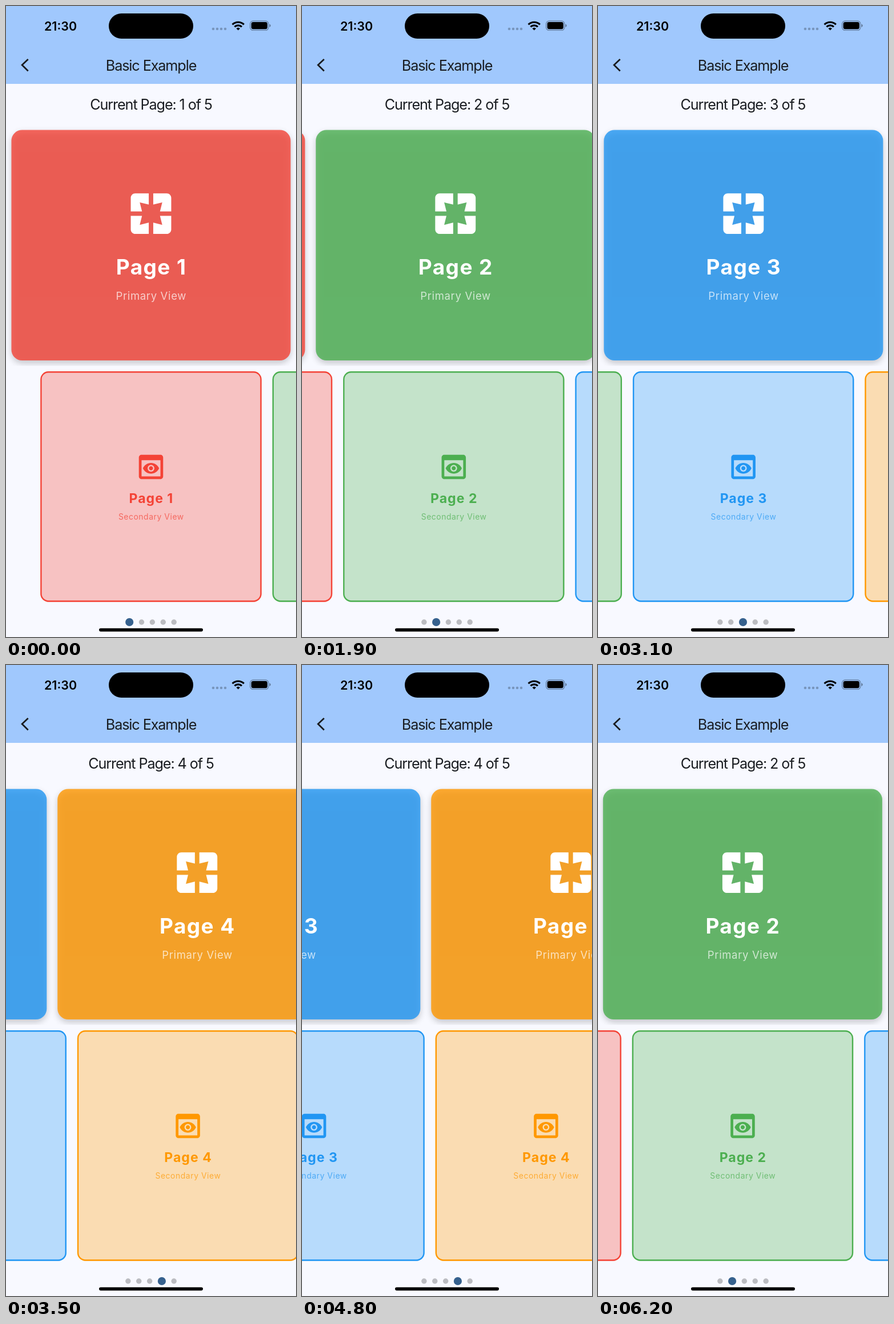
Recreate the animation shown at these times as an HTML page. Size 508 px wide and 1102 px high, loop 6300 ms.

```html
<!DOCTYPE html>
<html lang="en">
<head>
<meta charset="utf-8">
<title>Synced pages</title>
<style>
  html, body { margin: 0; width: 100%; height: 100%; overflow: hidden; background: #f8f9ff; }
  svg { display: block; width: 508px; height: 1102px; }
  text { font-family: Inter, "Open Sans", sans-serif; font-optical-sizing: none; text-anchor: middle; }
  .bar { font-size: 25.2px; letter-spacing: -1.1px; fill: #191c20; }
  .clock { font-size: 21.5px; font-weight: 600; }
  .title1 { font-size: 37px; font-weight: 700; letter-spacing: 1.4px; fill: #fff; }
  .note1 { font-size: 18.5px; letter-spacing: .65px; fill: #fff; opacity: .7; }
  .title2 { font-size: 23.1px; font-weight: 700; letter-spacing: 1px; }
  .note2 { font-size: 13.9px; letter-spacing: .55px; opacity: .7; }
  .shadow { filter: blur(6px); fill: #000; opacity: .2; }
</style>
</head>
<body>
<svg viewBox="0 0 508 1102">
  <defs>
    <clipPath id="topClip"><rect y="207" width="508" height="421.6"/></clipPath>
    <path id="pagesIcon" d="M3 5v6h5L7 7l4 1V3H5c-1.1 0-2 .9-2 2zm5 8H3v6c0 1.1.9 2 2 2h6v-5l-4 1 1-4zm9 4l-4-1v5h6c1.1 0 2-.9 2-2v-6h-5l1 4zm2-14h-6v5l4-1-1 4h5V5c0-1.1-.9-2-2-2z"/>
    <path id="previewIcon" d="M19 3H5c-1.11 0-2 .9-2 2v14c0 1.1.89 2 2 2h14c1.1 0 2-.9 2-2V5c0-1.1-.89-2-2-2zm0 16H5V7h14v12zm-5.5-6c0 .83-.67 1.5-1.5 1.5s-1.5-.67-1.5-1.5.67-1.5 1.5-1.5 1.5.67 1.5 1.5zM12 9c-2.73 0-5.06 1.66-6 4 .94 2.34 3.27 4 6 4s5.06-1.66 6-4c-.94-2.34-3.27-4-6-4zm0 6.5c-1.38 0-2.5-1.12-2.5-2.5s1.12-2.5 2.5-2.5 2.5 1.12 2.5 2.5-1.12 2.5-2.5 2.5z"/>
  </defs>
  <rect width="508" height="1102" fill="#f8f9ff"/>

  <rect width="508" height="136" fill="#a0c8fd"/>
  <text class="clock" x="95.5" y="42.5">21:30</text>
  <rect x="180" y="13" width="148" height="44" rx="22"/>
  <g fill="#000" opacity=".25">
    <circle cx="363" cy="40" r="2.3"/><circle cx="370" cy="40" r="2.3"/>
    <circle cx="377" cy="40" r="2.3"/><circle cx="384" cy="40" r="2.3"/>
  </g>
  <g fill="none" stroke="#000" stroke-width="3.2">
    <path d="M396.6 32.4a14.4 14.4 0 0 1 20.2 0M400.4 36.4a9 9 0 0 1 12.6 0"/>
    <path d="M406.7 42.6l-3.3-3.4a4.9 4.9 0 0 1 6.6 0z" fill="#000" stroke="none"/>
  </g>
  <rect x="427.6" y="26.1" width="32.3" height="16.4" rx="5.2" fill="none" stroke="#000" stroke-opacity=".4" stroke-width="1.2"/>
  <rect x="429.6" y="28.1" width="28.3" height="12.4" rx="3.4"/>
  <path d="M461.6 31.6q1.9 .8 1.9 2.7t-1.9 2.7z" opacity=".45"/>
  <path d="M38.7 93L28.1 103.1L38.7 113.4" fill="none" stroke="#191c20" stroke-width="2.8"/>
  <text class="bar" x="254" y="112.5">Basic Example</text>
  <text class="bar" id="status" x="254" y="181"></text>

  <g clip-path="url(#topClip)"><g id="primary"></g></g>
  <g id="secondary"></g>
  <g id="dots"></g>
  <rect x="163" y="1086.8" width="182" height="5.6" rx="2.8"/>
</svg>
<script>
  const $ = id => document.getElementById(id);
  const LOOP = 6300, STEP = 100, UNIT = 508 / 430;
  const PITCH = [508, 406.4];
  const colors = ['#f44336', '#4caf50', '#2196f3', '#ff9800', '#9c27b0'];

  // start ms, end ms, page from, page to, distance left at start, slow spring share
  const swipes = [
    [1500, 2300, 0, 1, .772, 1.1],
    [2400, 3100, 1, 2, .6575, .95],
    [3300, 4100, 2, 3, .7, 1],
    [4700, 5400, 3, 2, .95, 1.6],
    [5500, 6200, 2, 1, .56, .75]
  ];

  const icon = (id, y, size) =>
    `<use href="#${id}" transform="translate(${254 - size / 2} ${y - size / 2}) scale(${size / 24})"/>`;

  const primaryCard = (color, i) => {
    const box = 'x="9.45" width="489.1" height="402.7" rx="18.9"';
    return `<g transform="translate(${i * PITCH[0]})">
      <rect class="shadow" ${box} y="221.2"/>
      <rect ${box} y="216.4" fill="${color}" fill-opacity=".8"/>
      <g fill="#fff">${icon('pagesIcon', 362.6, 80 * UNIT)}</g>
      <text class="title1" x="254.5" y="469">Page ${i + 1}</text>
      <text class="note1" x="254.3" y="512.8">Primary View</text></g>`;
  };

  const secondaryCard = (color, i) =>
    `<g transform="translate(${i * PITCH[1]})" fill="${color}">
      <rect x="60.25" y="638" width="387.5" height="402.7" rx="14.2" fill-opacity=".3"/>
      <rect x="61.43" y="639.2" width="385.1" height="400.3" rx="13" fill="none" stroke="${color}" stroke-width="2.36"/>
      ${icon('previewIcon', 805, 48 * UNIT)}
      <text class="title2" x="254.4" y="867.6">Page ${i + 1}</text>
      <text class="note2" x="254.3" y="897">Secondary View</text></g>`;

  $('primary').innerHTML = colors.map(primaryCard).join('');
  $('secondary').innerHTML = colors.map(secondaryCard).join('');
  $('dots').innerHTML = colors.map(() => '<circle cy="1076"/>').join('');
  const dots = [...$('dots').children];

  // Slightly overdamped spring, as in a paged scroll view
  function positionAt(ms) {
    const swipe = swipes.filter(s => s[0] <= ms).pop();
    if (!swipe) return 0;
    const [start, end, from, to, left, slow] = swipe;
    const t = (Math.min(ms, end) - start) / 1000;
    const rest = slow * Math.exp(-9.08 * t) + (left - slow) * Math.exp(-22 * t);
    return rest < .001 ? to : to + (from - to) * rest;
  }

  function showPage(page) {
    $('status').textContent = `Current Page: ${page + 1} of 5`;
    let x = 254 - 42 * UNIT;
    dots.forEach((dot, i) => {
      const size = (i === page ? 12 : 8) * UNIT, cell = size + 8 * UNIT;
      dot.setAttribute('cx', x + cell / 2);
      dot.setAttribute('r', size / 2);
      dot.setAttribute('fill', i === page ? '#36618e' : '#bbbcc1');
      x += cell;
    });
  }

  const begin = performance.now();
  let lastMs = -1;
  function draw() {
    const ms = Math.floor((performance.now() - begin) % LOOP / STEP) * STEP;
    if (ms !== lastMs) {
      lastMs = ms;
      const p = positionAt(ms);
      $('primary').setAttribute('transform', `translate(${-p * PITCH[0]})`);
      $('secondary').setAttribute('transform', `translate(${-p * PITCH[1]})`);
      showPage(Math.round(p));
    }
    requestAnimationFrame(draw);
  }
  draw();
</script>
</body>
</html>
```
